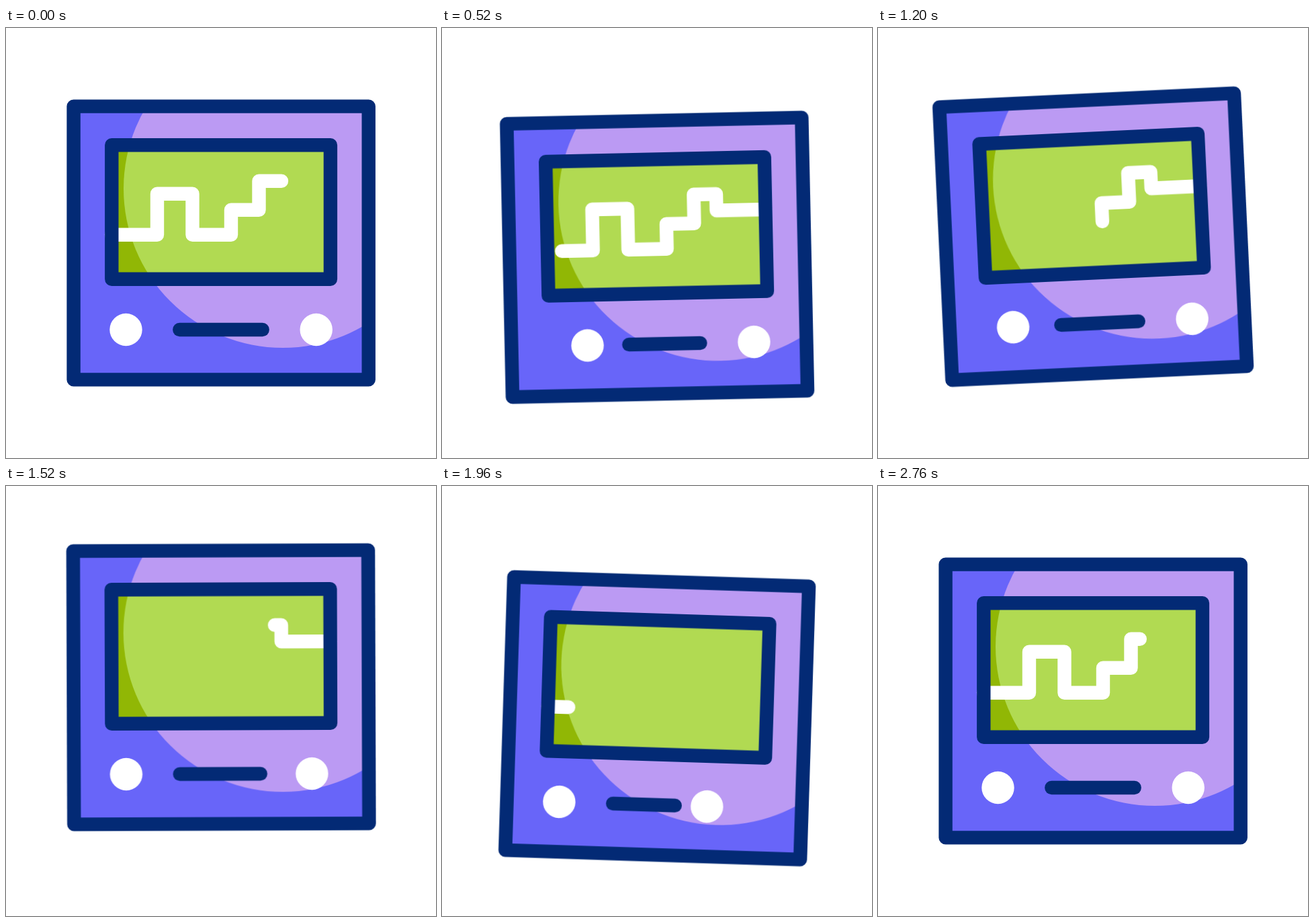
An HTML page that plays this animation: 640x640 px, repeating every 2.8 s.

```html
<!DOCTYPE html>
<html lang="en">
<head>
<meta charset="utf-8">
<title>Signal monitor</title>
<style>
  html, body { margin: 0; width: 100%; height: 100%; overflow: hidden; background: #fff; }
  svg { display: block; width: 100vw; height: 100vh; }

  .bob, .tilt, .knob, .slot, .trace { animation: 2800ms linear infinite; }
  .bob, .knob, .slot { animation-timing-function: cubic-bezier(.333, 0, .667, 1); }
  .bob { animation-name: bob; }
  .tilt { animation-name: tilt; transform-origin: 320px 320px; }
  .left { animation-name: left; }
  .right { animation-name: right; }
  .slot { animation-name: slot; }
  .trace { animation-name: trace; }

  .line { fill: none; stroke: #032a75; stroke-width: 20.4; stroke-linecap: round; stroke-linejoin: round; }
  .trace { stroke: #fff; }
  .knob { fill: #fff; }

  @keyframes bob {
    0%, 7.143% { transform: translateY(0); }
    28.571% { transform: translateY(38.5px); }
    50% { transform: translateY(-26px); }
    71.429% { transform: translateY(26.3px); }
    92.857%, 100% { transform: translateY(0); }
  }
  @keyframes tilt {
    0% { transform: rotate(0deg); }
    7.143% { transform: rotate(0deg); animation-timing-function: cubic-bezier(.333, 0, .667, .522); }
    18.571% { transform: rotate(-1.22deg); animation-timing-function: cubic-bezier(.333, .256, .667, .717); }
    30% { transform: rotate(-3.5deg); animation-timing-function: cubic-bezier(.333, .564, .667, 1); }
    35% { transform: rotate(-4deg); animation-timing-function: cubic-bezier(.333, 0, .667, .637); }
    42.857% { transform: rotate(-2.7deg); animation-timing-function: cubic-bezier(.333, .306, .667, .629); }
    50% { transform: rotate(-1.3deg); animation-timing-function: cubic-bezier(.333, .284, .667, .649); }
    54.286% { transform: rotate(-.2deg); animation-timing-function: cubic-bezier(.333, .321, .667, .708); }
    60% { transform: rotate(1.4deg); animation-timing-function: cubic-bezier(.333, .412, .667, 1); }
    64.286% { transform: rotate(2.25deg); animation-timing-function: cubic-bezier(.333, 0, .667, .697); }
    70% { transform: rotate(1.83deg); animation-timing-function: cubic-bezier(.333, .354, .667, .576); }
    80% { transform: rotate(1.2deg); animation-timing-function: cubic-bezier(.333, .286, .667, 1); }
    92.857%, 100% { transform: rotate(0deg); }
  }
  @keyframes left {
    0%, 7.143%, 50%, 100% { transform: translateX(0); }
    28.571% { transform: translateX(64px); }
  }
  @keyframes right {
    0%, 50%, 92.857%, 100% { transform: translateX(0); }
    71.429% { transform: translateX(-64px); }
  }
  @keyframes slot {
    0%, 7.143%, 50%, 92.857%, 100% { stroke-dasharray: 123.4px 300px; stroke-dashoffset: 0px; }
    28.571% { stroke-dasharray: 92.2px 300px; stroke-dashoffset: -31.2px; }
    71.429% { stroke-dasharray: 92.2px 300px; stroke-dashoffset: 0px; }
  }
  /* the tail wipes the signal out, then the head draws it again across the loop point */
  @keyframes trace {
    0% { stroke-dasharray: 454.5px 1000px; stroke-dashoffset: 0px; }
    6.93%, 16.79% { stroke-dasharray: 552.5px 1000px; stroke-dashoffset: 0px; }
    63.36% { stroke-dasharray: 0px 1000px; stroke-dashoffset: -552.5px; }
    63.37%, 67.86% { stroke-dasharray: 0px 1000px; stroke-dashoffset: 0px; }
    100% { stroke-dasharray: 454.5px 1000px; stroke-dashoffset: 0px; }
  }
</style>
</head>
<body>
<svg viewBox="0 0 640 640">
  <defs>
    <clipPath id="case"><rect x="100.5" y="116.5" width="439.3" height="407"/></clipPath>
    <clipPath id="screen"><rect x="157.3" y="174" width="325.6" height="199.7"/></clipPath>
  </defs>
  <g class="bob">
    <g class="tilt">
      <g clip-path="url(#case)">
        <rect x="100" y="116" width="440" height="408" fill="#6865f9"/>
        <circle cx="412" cy="239" r="237" fill="#bb9af3"/>
      </g>
      <rect class="line" x="100.6" y="116.6" width="439.1" height="406.8"/>
      <g clip-path="url(#screen)">
        <rect x="157" y="174" width="326" height="200" fill="#91b705"/>
        <circle cx="412" cy="239" r="237" fill="#b1da52"/>
      </g>
      <path class="line trace" d="M157 307.7H225V246.7H277.5V307.7H335V270.7H376.5V227.7H410V252.2H483"/>
      <rect class="line" x="157.3" y="174.2" width="325.6" height="199.5"/>
      <path class="line slot" d="M258.3 449H381.7"/>
      <circle class="knob left" cx="178.5" cy="449" r="24.2"/>
      <circle class="knob right" cx="461.7" cy="449" r="24.2"/>
    </g>
  </g>
</svg>
</body>
</html>
```
